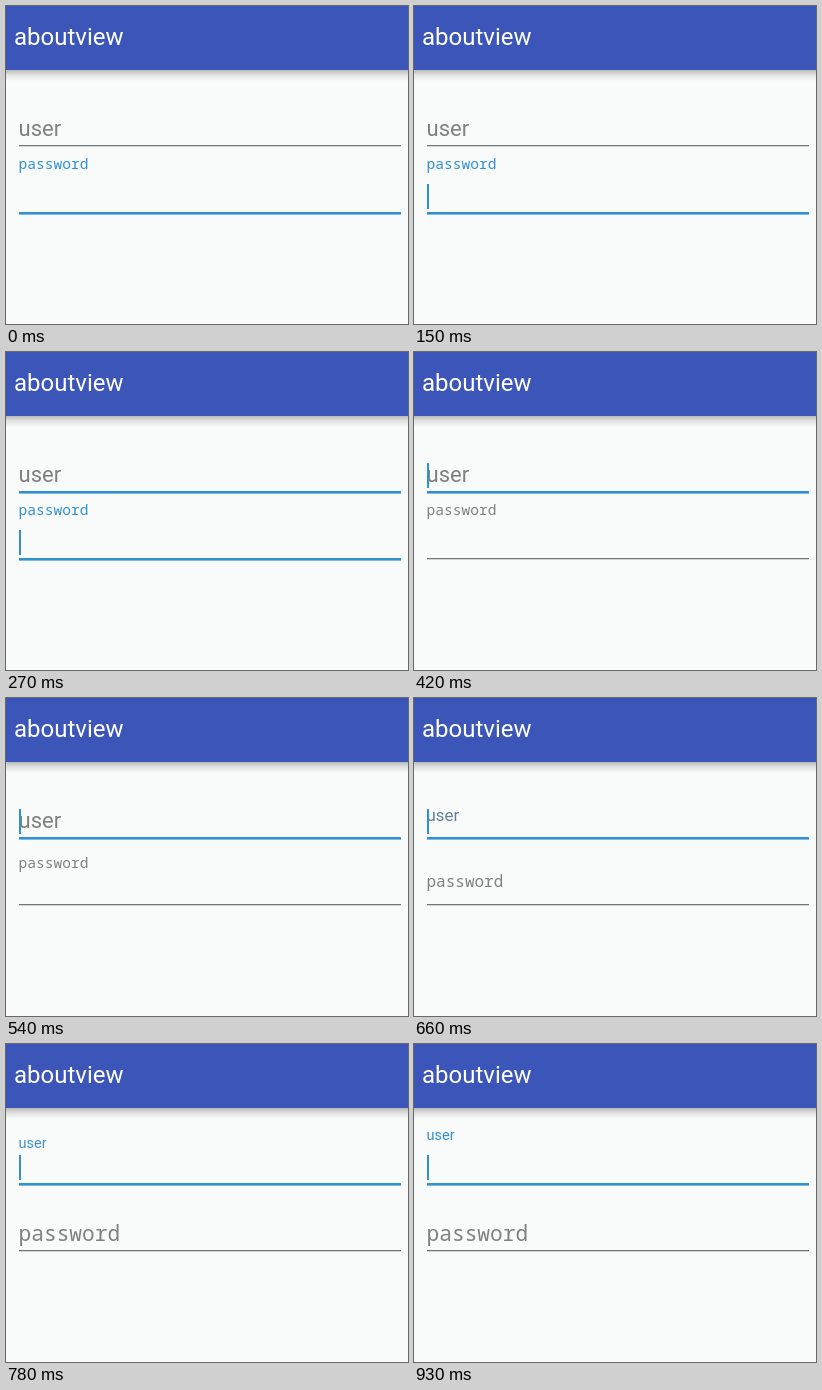
An HTML page with a canvas that plays this animation: 402 px wide and 318 px high, repeating every 1060 ms.

```html
<!DOCTYPE html>
<html lang="en">
<head>
<meta charset="utf-8">
<title>Floating labels</title>
<style>
html, body { margin: 0; width: 100%; height: 100%; overflow: hidden; background: #f9fbfa; }
canvas { display: block; }
</style>
</head>
<body>
<canvas id="stage" width="402" height="318"></canvas>
<script>
const ctx = document.getElementById('stage').getContext('2d');
const LOOP = 1060;
const BLUE = '#3090d2', GRAY = '#808080', LINE = '#757575';
const SANS = 'Roboto, sans-serif', MONO = '"Noto Sans Mono", monospace';

// Labels are [font size, baseline, colour]; the caret is the top of its box
const steps = [
  { at: 0, user: [22, 129.5, GRAY], pass: [14.6, 163, BLUE], lines: [0, 1] },
  { at: 150, user: [22, 129.5, GRAY], pass: [14.6, 163, BLUE], lines: [0, 1], caret: 178 },
  { at: 270, user: [22, 129.5, GRAY], pass: [14.6, 163, BLUE], lines: [1, 1], caret: 178 },
  { at: 420, user: [22, 129.5, GRAY], pass: [14.6, 163, GRAY], lines: [1, 0], caret: 111 },
  { at: 540, user: [22, 129.5, GRAY], pass: [14.6, 170, GRAY], lines: [1, 0], caret: 111 },
  { at: 660, user: [16.9, 122.5, '#627f98'], pass: [16, 189, GRAY], lines: [1, 0], caret: 111 },
  { at: 780, user: [14.5, 103.5, '#4590c2'], pass: [21.2, 196.5, GRAY], lines: [1, 0], caret: 111 },
  { at: 930, user: [14.5, 96, BLUE], pass: [21.2, 197, GRAY], lines: [1, 0], caret: 111 }
];

function rect(x, y, w, h, fill) {
  ctx.fillStyle = fill;
  ctx.fillRect(x, y, w, h);
}

function label(text, x, [size, y, fill], family) {
  ctx.font = `${size}px ${family}`;
  ctx.fillStyle = fill;
  ctx.fillText(text, x, y);
}

const shadow = ctx.createLinearGradient(0, 64, 0, 75);
shadow.addColorStop(0, '#b9bbbb');
shadow.addColorStop(0.45, '#e0e2e1');
shadow.addColorStop(1, '#f9fbfa');

function draw(now) {
  const time = now % LOOP;
  const step = steps.findLast(s => s.at <= time);

  rect(0, 0, 402, 318, '#f9fbfa');
  rect(0, 64, 402, 11, shadow);
  rect(0, 0, 402, 64, '#3c55b9');
  label('aboutview', 8, [24, 39, '#fff'], SANS);

  label('user', 12.5, step.user, SANS);
  label('password', 12.5, step.pass, MONO);
  [139, 206].forEach((y, i) => {
    const active = step.lines[i];
    rect(13, y, 382, active ? 2.6 : 1.3, active ? BLUE : LINE);
  });
  if (step.caret) rect(13, step.caret, 2, 25, BLUE);
}

const start = performance.now();
function tick() {
  draw(performance.now() - start);
  requestAnimationFrame(tick);
}
tick();
</script>
</body>
</html>
```
